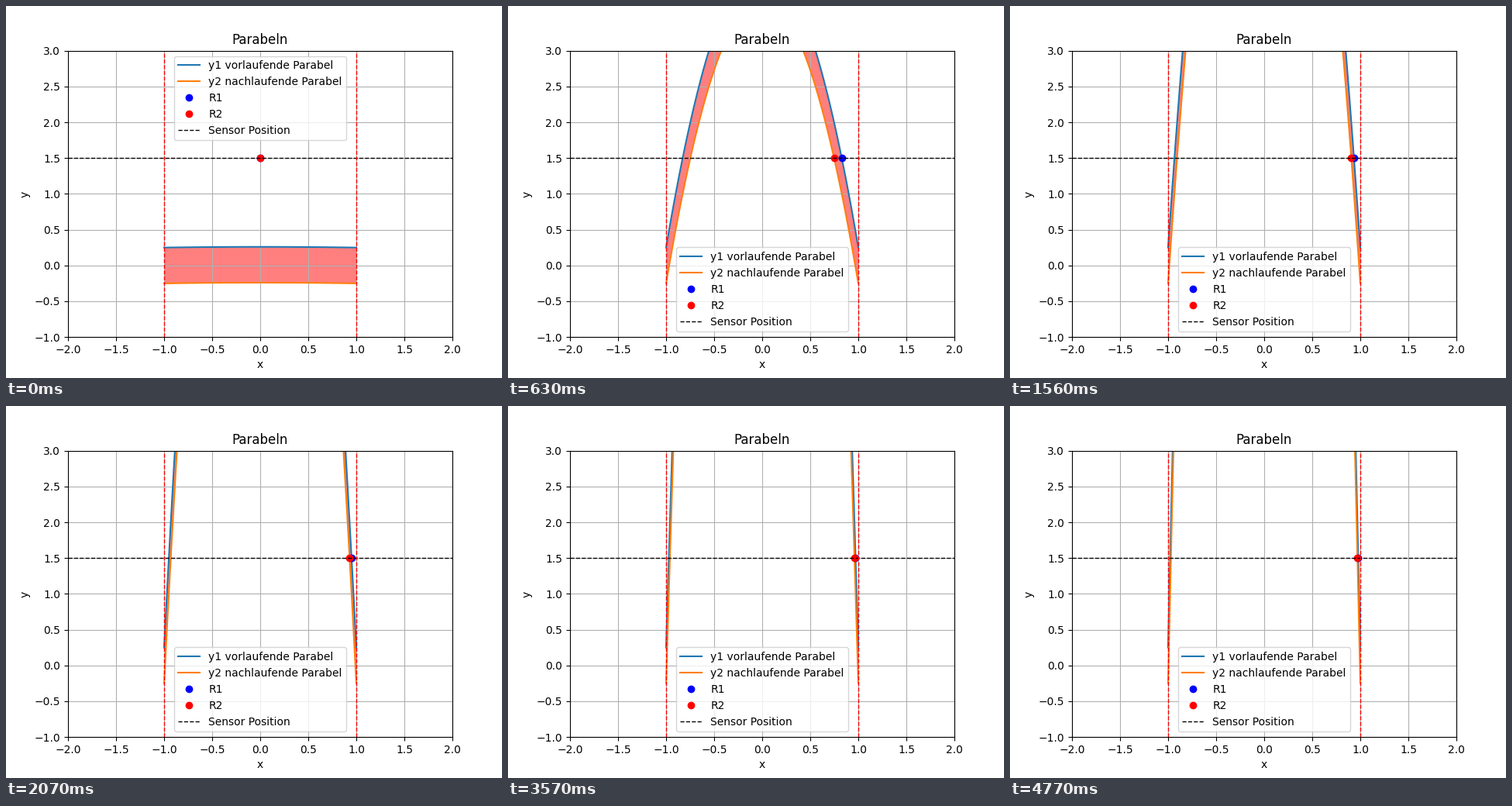
A matplotlib script for the animation above (4.8 s loop, 640 px wide and 480 px high).

```python
import numpy as np
import matplotlib.pyplot as plt
from matplotlib.animation import FuncAnimation

FRAMES = 160
INTERVAL = 30
SENSOR = 1.5
HALF_GAP = 0.25

heights = np.linspace(0.01, 30, FRAMES)
x = np.linspace(-1, 1, 100)


def crossing(height, offset):
    """Right-hand x where the parabola meets the sensor line, 0 if it is below."""
    return np.sqrt(max(0.0, 1 - (SENSOR - offset) / height))


fig, ax = plt.subplots(figsize=(6.4, 4.8), dpi=100)
ax.set(xlim=(-2, 2), ylim=(-1, 3), xlabel="x", ylabel="y", title="Parabeln")
ax.grid(True)

band = ax.fill_between(x, x, x, color="red", alpha=0.5, linewidth=0)
front, = ax.plot([], [], label="y1 vorlaufende Parabel")
back, = ax.plot([], [], label="y2 nachlaufende Parabel")
r1, = ax.plot([], [], "bo", label="R1")
r2, = ax.plot([], [], "ro", label="R2")
ax.axhline(SENSOR, color="black", linestyle="--", linewidth=1, label="Sensor Position")
for edge in (-1, 1):
    ax.axvline(edge, color="red", linestyle="--", linewidth=1)

# The legend moves to the emptiest spot on every draw.
ax.legend(loc="best")


def update(frame):
    height = heights[frame]
    arch = height * (1 - x**2)
    y1, y2 = arch + HALF_GAP, arch - HALF_GAP
    front.set_data(x, y1)
    back.set_data(x, y2)
    band.set_verts([np.column_stack([np.r_[x, x[::-1]], np.r_[y1, y2[::-1]]])])
    r1.set_data([crossing(height, HALF_GAP)], [SENSOR])
    r2.set_data([crossing(height, -HALF_GAP)], [SENSOR])
    return front, back, band, r1, r2


anim = FuncAnimation(fig, update, frames=FRAMES, interval=INTERVAL, repeat=True, repeat_delay=0)
plt.show()
```
